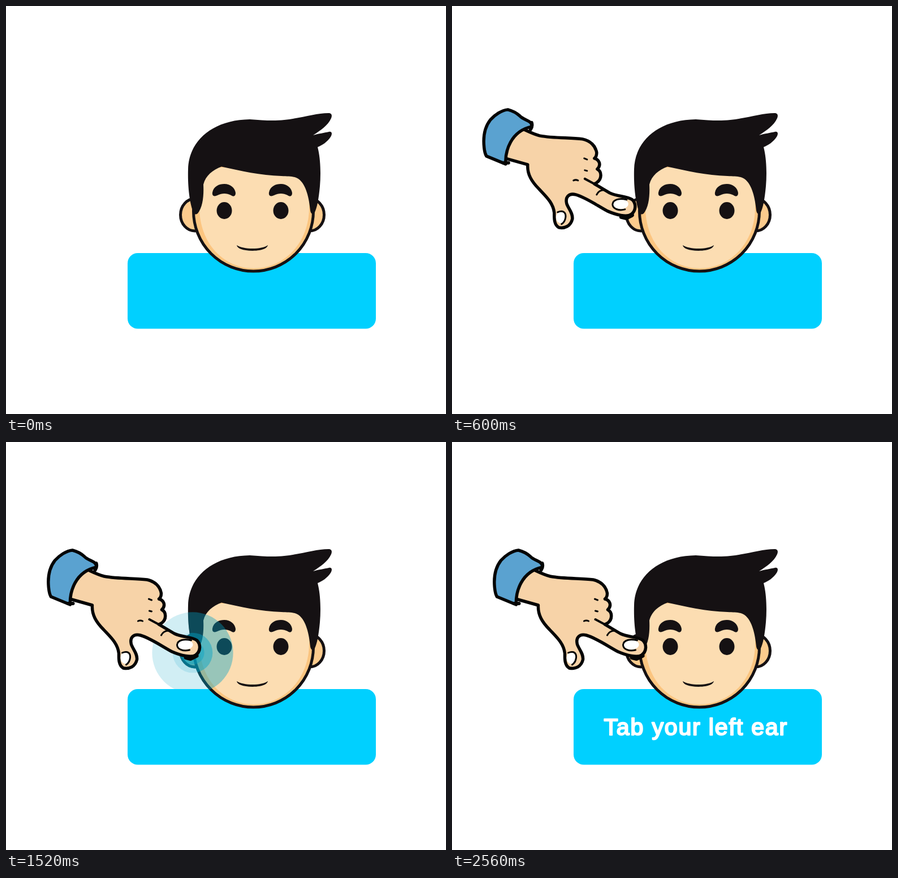
Write an HTML page that moves like this. It is 778 px wide and 720 px high and loops after 4.8 s.

```html
<!DOCTYPE html>
<html lang="en">
<head>
<meta charset="utf-8">
<title>Left ear</title>
<style>
  html, body { margin: 0; width: 100%; height: 100%; overflow: hidden; background: #fff; }
  svg { display: block; width: 100vw; height: 100vh; }
  text { font: 41px "Liberation Sans", Arial, sans-serif; letter-spacing: 1.85px; }
</style>
</head>
<body>
<svg viewBox="0 0 778 720">
  <defs>
    <clipPath id="wipe"><rect id="wipeBox" x="260" y="470" width="0" height="70"/></clipPath>
    <path id="brow" d="M365 329C367 318 377 314 386 314C397 314 405 321 406 330C406 336 402 337 398 334C390 330 382 330 374 334C368 337 364 335 365 329Z"/>
    <path id="hair" d="M332 366C325 350 321 320 322 288C323 238 365 201 431 200C455 202 475 203 492 201C522 198 548 189 570 189C576 189 577 193 575 198C569 211 557 219 543 228C554 225 562 224 571 222C577 221 577 226 574 231C568 240 560 245 551 249C556 268 557 295 555 318C553 340 550 357 545 366C541 368 539 366 538 361C536 340 531 315 517 305C509 300 501 301 487 300C450 299 415 291 381 283.500C366 289 353 299 349 315C350 335 348 355 339 366Q335 369 332 366Z"/>
    <clipPath id="headShape">
      <use href="#hair"/>
      <circle cx="437.5" cy="362" r="108.5"/>
      <ellipse cx="334" cy="368.5" rx="28" ry="31"/>
    </clipPath>
    <g id="ripple" fill="#00a0c3">
      <circle r="73" opacity=".4"/>
      <circle r="36" opacity=".45"/>
      <circle r="21" opacity=".4"/>
    </g>
  </defs>

  <!-- the ripple is fainter on the page than on the head -->
  <g opacity=".45"><use href="#ripple"/></g>
  <rect x="215" y="436" width="439" height="133.5" rx="18" fill="#00d0ff"/>

  <g id="head" fill="#151113">
    <g stroke="#151113" stroke-width="5">
      <g fill="#fccb8d">
        <ellipse cx="334" cy="368.5" rx="25.5" ry="28.5"/>
        <ellipse cx="537" cy="368.5" rx="25.5" ry="28.5"/>
      </g>
      <circle cx="437.5" cy="362" r="106" fill="#fcc580"/>
    </g>
    <path fill="#fcddb2" d="M342 300V355C342 420 386 463 438 463S536 420 536 355V300L500 285H375Z"/>
    <use href="#hair"/>
    <use href="#brow"/>
    <use href="#brow" x="100"/>
    <ellipse cx="386" cy="361" rx="13.500" ry="15"/>
    <ellipse cx="486" cy="361" rx="13.500" ry="15"/>
    <path d="M408 422C420 430 452 430 463 422C462 427 455 431.500 436 432C418 431.500 409 428 408 422Z"/>
  </g>

  <g clip-path="url(#headShape)"><use href="#ripple"/></g>

  <g id="hand" stroke="#050505" stroke-width="5.500" stroke-linecap="round" stroke-linejoin="round" fill="none">
    <path fill="#f7d3a8" d="M82 198C93 203 102 208 114 211C140 216 168 214 190 217C204 220 213 229 215 241Q215 248 211 251C219 253 224 262 216 270C224 274 225 287 215 294L211 296L238 312C252 319 268 317 278 324C285 331 285 343 276 350C268 355 250 351 234 344C217 335 196 320 178 315C166 312 159 319 162 331C165 340 173 347 172 358C169 371 158 375 148 373C139 368 140 355 140 347C138 329 125 318 113 305C100 292 92 279 93 262L50 250L55 205Z"/>
    <path d="M259 354L267 356L277 351" stroke-width="8"/>
    <path d="M194 287L222 302" stroke-width="4"/>
    <path d="M215 315Q219 307 228 307M193 251L198 253M194 272L198 273M174 290Q178 288 182 290" stroke-width="3"/>
    <g fill="#fff" stroke="none">
      <ellipse cx="257" cy="331.500" rx="14" ry="9"/>
      <ellipse cx="152" cy="355" rx="9" ry="10.500"/>
    </g>
    <path d="M265 341C254 344 243 340 243 332C244 323 256 321 268 324M146 346C155 342 161 346 160 355Q159 363 153 367" stroke-width="3"/>
    <path fill="#5aa2d0" d="M58 165C47 166 35 174 27 183C16 197 14 214 16 232Q17 242 20 247L54 261C53 238 63 203 100 195C102 184 86 184 79 176Q70 168 58 165Z"/>
    <path d="M100 188Q102 194 98 200M50 259L59 259" stroke-width="6"/>
  </g>

  <g clip-path="url(#wipe)">
    <text x="268.500" y="516.500" fill="#fff" stroke="#fff" stroke-width="2.400" stroke-linejoin="round">Tab your left ear</text>
  </g>
</svg>
<script>
  const LOOP = 4800, STEP = 40;
  const $ = id => document.getElementById(id);
  const ramp = (t, a, b) => Math.min(1, Math.max(0, (t - a) / (b - a)));
  const smooth = u => u * u * (3 - 2 * u);
  const easeOut = u => 1 - (1 - u) ** 2;

  function draw(t) {
    const move = smooth(ramp(t, 146, 860));
    $('hand').setAttribute('transform', `translate(${-2.5 + 62 * move} ${-1 + 27 * move})`);
    $('hand').setAttribute('opacity', ramp(t, 0, 200));

    const size = 78 / 73 * easeOut(ramp(t, 1120, 1680));
    $('ripple').setAttribute('transform', `translate(330 372) scale(${size})`);
    $('ripple').setAttribute('opacity', 1 - ramp(t, 1680, 1960));

    const dt = Math.min(t, 2600) - 2000;
    const edge = dt < -40 ? 260 : 280.5 + 0.458 * dt + 0.000194 * dt * dt;
    $('wipeBox').setAttribute('width', Math.max(0, edge - 260));
  }

  const start = performance.now();
  function tick(now) {
    const t = Math.max(0, now - start) % LOOP;
    draw(Math.floor(t / STEP) * STEP);
    requestAnimationFrame(tick);
  }
  draw(0);
  requestAnimationFrame(tick);
</script>
</body>
</html>
```
